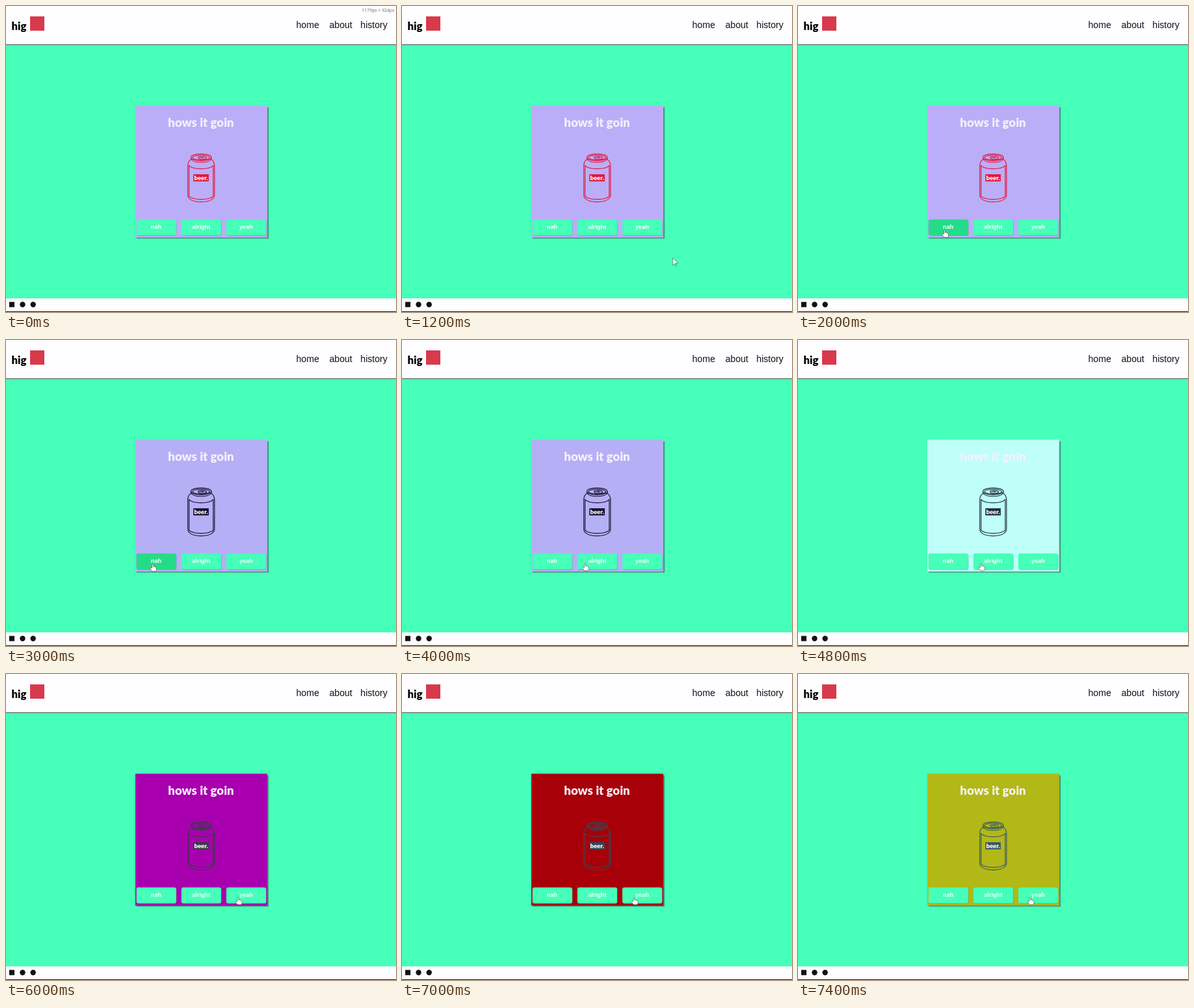
An HTML page for the animation above (8 s loop, 600 by 471 pixels).

```html
<!DOCTYPE html>
<html lang="en">
<head>
<meta charset="utf-8">
<title>hig</title>
<style>
html, body { margin: 0; height: 100%; overflow: hidden; background: #fefdff; }
svg { display: block; width: 100vw; height: 100vh; }
.head { font-family: Lato, "Open Sans", sans-serif; font-weight: 900; }
.nav { font: 14.1px "Liberation Sans", Arial, sans-serif; fill: #111; }
.label { font: bold 9.2px "Liberation Sans", Arial, sans-serif; fill: #f4fffb; text-anchor: middle; }
.size { font: 6.8px "Noto Sans", sans-serif; fill: #777; text-anchor: end; }
</style>
</head>
<body>
<svg viewBox="0 0 600 471">
  <rect width="600" height="471" fill="#fefdff"/>
  <rect y="59" width="600" height="391" fill="#46ffb9"/>
  <rect y="59" width="600" height="1" fill="#4a5552"/>
  <rect y="470" width="600" height="1" fill="#111"/>

  <text class="head" x="8.5" y="36.6" font-size="16.8">hig</text>
  <rect x="37" y="16" width="22" height="22" fill="#d83a4c"/>
  <g class="nav">
    <text x="446.5" y="34">home</text>
    <text x="497.5" y="34">about</text>
    <text x="545.3" y="34">history</text>
  </g>
  <text id="size" class="size" x="597.5" y="9.4">1179px × 924px</text>

  <rect x="5" y="455.5" width="8" height="8" fill="#111"/>
  <circle cx="25.5" cy="459.5" r="4.2" fill="#111"/>
  <circle cx="41.7" cy="459.5" r="4.2" fill="#111"/>

  <rect x="201" y="156" width="203" height="202" fill="#46907e"/>
  <rect id="card" x="199" y="153.5" width="203" height="203"/>
  <text class="head" x="300" y="186" font-size="18.6" text-anchor="middle" fill="#f5f0fa">hows it goin</text>

  <g id="can" fill="none" stroke-width="1.2" transform="translate(300.2 264.3) scale(.98)">
    <ellipse cy="-32" rx="16" ry="5.5"/>
    <ellipse cy="-31.5" rx="13.5" ry="3.8"/>
    <ellipse cx="2" cy="-31" rx="6.5" ry="2"/>
    <path d="M-5-33l9 2"/>
    <path d="M-16-32v3q-5 4-5 10v46q0 4 4 7 5 4 17 4t17-4q4-3 4-7v-46q0-6-5-10v-3"/>
    <path d="M-16-29q4 5 16 5t16-5"/>
    <path d="M-19-19q4 5 19 5t19-5v48q-4 5-19 5t-19-5z"/>
  </g>
  <rect id="tag" x="288.3" y="259" width="23.6" height="11"/>
  <text class="head" x="300.1" y="268" font-size="9.6" text-anchor="middle" fill="#fff">beer.</text>

  <g id="buttons"></g>

  <g id="cursor" fill="#fff" stroke="#444" stroke-width=".6" stroke-linejoin="round">
    <path id="arrow" d="M0 0v11l3-2 2 4 1-1-2-4h4z"/>
    <path id="hand" d="M-1 6V1q0-1 1-1t1 1v3q1-1 2 0 1 0 2 1 1 0 1 1v2q0 1-1 3H-1q-1-2-3-4 0-1 1-1z"/>
  </g>
</svg>
<script>
const LOOP = 8000, STEP = 200;
const $ = id => document.getElementById(id);

$("buttons").innerHTML = ["nah", "alright", "yeah"].map((name, i) => `
  <g transform="translate(${200.6 + 69.2 * i} 328.6)">
    <rect x=".6" y=".8" width="61.2" height="24.4" rx="3" fill="#4d8f8c" opacity=".6"/>
    <rect class="face" width="61.2" height="24.4" rx="3" fill="#46ffb9"/>
    <text class="label" x="30.4" y="14.7">${name}</text>
  </g>`).join("");
const nah = document.querySelector(".face");

// Each change of look or place starts at its time and lasts for ms.
const looks = [
  { time: 0, ms: 1, card: "#bbaef8", ink: "#e2183e" },
  { time: 2600, ms: 400, card: "#b5aff6", ink: "#181430" },
  { time: 4400, ms: 200, card: "#befff9", ink: "#22323e" },
  { time: 5200, ms: 400, card: "#a800ae", ink: "#343e46" },
  { time: 6000, ms: 400, card: "#a70008", ink: "#324858" },
  { time: 7000, ms: 400, card: "#b2b816", ink: "#3a5864" }
];
const moves = [
  { time: 0, ms: 1, x: 560, y: 420 },
  { time: 600, ms: 1400, x: 225.5, y: 345 },
  { time: 3200, ms: 600, x: 281.5, y: 344 },
  { time: 5200, ms: 400, x: 357, y: 344 }
];

function progress(list, t) {
  const i = list.findLastIndex(e => e.time <= t), to = list[i];
  return { from: list[i - 1] || to, to, k: Math.min(1, (t - to.time) / to.ms) };
}
const mix = (p, key) => `color-mix(in srgb, ${p.to[key]} ${p.k * 100}%, ${p.from[key]})`;
const lerp = (p, key) => p.from[key] + (p.to[key] - p.from[key]) * p.k;
const show = (id, on) => $(id).style.display = on ? "" : "none";

function draw(t) {
  const look = progress(looks, t), move = progress(moves, t);
  $("card").style.fill = mix(look, "card");
  $("can").style.stroke = $("tag").style.fill = mix(look, "ink");

  const x = lerp(move, "x"), y = lerp(move, "y"), over = y < 353 && x < 401;
  $("cursor").setAttribute("transform", `translate(${x} ${y})`);
  nah.style.fill = over && x < 262 ? "#24dc88" : "";
  show("cursor", t >= 800);
  show("hand", over);
  show("arrow", !over);
  show("size", t < 1000);
}

const start = performance.now();
function frame() {
  const t = (performance.now() - start) % LOOP;
  draw(Math.floor(t / STEP) * STEP);
  requestAnimationFrame(frame);
}
frame();
</script>
</body>
</html>
```
